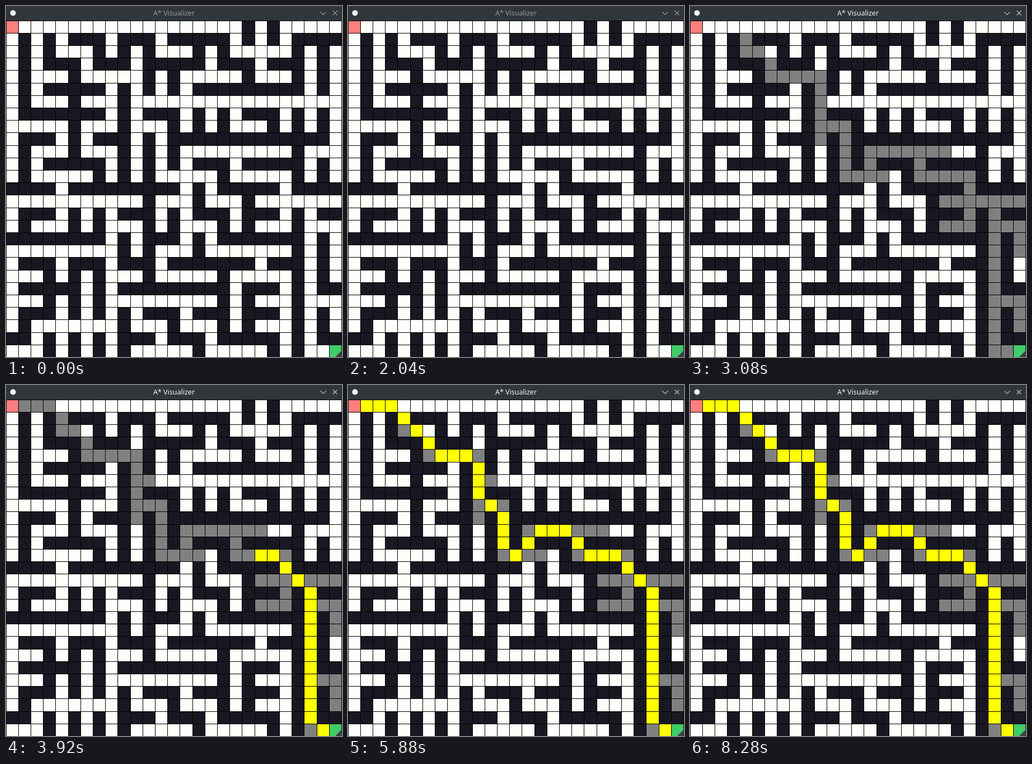
Animation, 600 px wide and 625 px high, one loop 8.32 s. Source, as an HTML page with a canvas:

```html
<!DOCTYPE html>
<html lang="en">
<head>
<meta charset="utf-8">
<title>A* Visualizer</title>
<style>
html, body { margin: 0; width: 100%; height: 100%; overflow: hidden; background: #31363b; }
canvas { display: block; }
</style>
</head>
<body>
<canvas width="600" height="625"></canvas>
<script>
const maze = `
...................#.#.....
.#.#.###.###.#####.#.#.####
.#.#...#.#.#...#.#.....#.#.
.#.###.###.#####.###.###.#.
.#...#.....#.#.....#...#.#.
.#.#####.#.#.#.#########.#.
.#...#...#.................
.#######.#.###.#.#.###.#.#.
.....#...#...#.#.#...#.#.#.
.###.#.###.#.#############.
.#...#...#.#.#.........#...
.#.#####.#.#.#.###.#####.#.
.#.....#.#.#.....#.....#.#.
####.#########.#.#####.####
...........#...#...#.......
.###.#.#.###.#.###.###.#.##
.#...#.#...#.#...#.#...#...
########.#.###.#.#######.#.
.........#.#...#.......#.#.
.###.###.###.#######.###.#.
...#.#.#...#.....#.....#.#.
.#####.#.#########.###.#.##
...#.#.#.........#.#...#...
.###.#.#.#.###.###.###.#.#.
.#.......#...#...#.#...#.#.
##.#.#.#.###.###.#####.#.##
...#.#.#.#.....#.....#.#...`.trim().split('\n');

const N = 27, SIZE = 22.2, TOP = 26, LOOP = 8320;
const FOCUS = 2050, SEARCH = 2330, VISIT = 10.7, TRACE = 3125, STEP = 49;
const ctx = document.querySelector('canvas').getContext('2d');

// A* from the bottom right to the top left; the first parent found is kept.
function solve() {
  const first = { r: N - 1, c: N - 1, g: 0, f: 0 };
  const open = [first], seen = new Set([N * N - 1]), visited = [], path = [];
  while (open.length) {
    open.sort((a, b) => a.f - b.f);
    const cell = open.shift();
    if (!cell.r && !cell.c) {
      for (let p = cell.parent; p !== first; p = p.parent) path.unshift(p);
      break;
    }
    if (cell !== first) visited.push(cell);
    for (let dr = -1; dr <= 1; dr++) for (let dc = -1; dc <= 1; dc++) {
      const r = cell.r + dr, c = cell.c + dc, id = r * N + c;
      if (maze[r]?.[c] !== '.' || seen.has(id)) continue;
      seen.add(id);
      const g = cell.g + Math.hypot(dr, dc);
      open.push({ r, c, g, f: g + Math.hypot(r, c), parent: cell });
    }
  }
  return { visited, path };
}
const { visited, path } = solve();

function fillCell(r, c, color) {
  const x = Math.floor(c * SIZE) + 1, y = TOP + Math.floor(r * SIZE) + 1;
  ctx.fillStyle = color;
  ctx.fillRect(x, y, Math.floor((c + 1) * SIZE) - x, TOP + Math.floor((r + 1) * SIZE) - y);
}

function line(...points) {
  ctx.beginPath();
  for (const [x, y] of points) ctx.lineTo(x, y);
  ctx.stroke();
}

function titleBar(t) {
  const k = Math.min(1, Math.max(0, (t - FOCUS) / 150));
  const gray = (a, b) => `rgb(${[0, 1, 2].map(() => Math.round(a + (b - a) * k))})`;
  ctx.fillStyle = '#31363b';
  ctx.fillRect(0, 0, 600, TOP);
  ctx.fillStyle = '#fcfcfc';
  ctx.beginPath();
  ctx.arc(12.5, 12.5, 5, 0, 7);
  ctx.fill();
  ctx.fillStyle = gray(150, 245);
  ctx.font = '12.5px "Noto Sans", sans-serif';
  ctx.textAlign = 'center';
  ctx.fillText('A* Visualizer', 300, 17);
  ctx.strokeStyle = gray(150, 190);
  ctx.lineWidth = 1.1;
  line([561.5, 10.5], [566.5, 15.5], [571.5, 10.5]);
  line([583.5, 8.5], [591.5, 16.5]);
  line([591.5, 8.5], [583.5, 16.5]);
}

function draw(now) {
  const t = now % LOOP;
  ctx.fillStyle = '#020204';
  ctx.fillRect(0, 0, 600, 625);
  titleBar(t);
  for (let r = 0; r < N; r++)
    for (let c = 0; c < N; c++)
      fillCell(r, c, maze[r][c] === '#' ? '#191722' : '#fdfffa');
  visited.forEach((p, i) => t >= SEARCH + (i + 1) * VISIT && fillCell(p.r, p.c, '#808080'));
  path.forEach((p, i) => t >= TRACE + (i + 1) * STEP && fillCell(p.r, p.c, '#ffff00'));
  fillCell(0, 0, '#ff7f7f');
  fillCell(N - 1, N - 1, '#40cc68');
  ctx.fillStyle = '#3b4047';
  ctx.beginPath();
  ctx.moveTo(600, 613);
  ctx.lineTo(600, 625);
  ctx.lineTo(588, 625);
  ctx.fill();
  requestAnimationFrame(() => draw(performance.now() - start));
}
const start = performance.now();
draw(0);
</script>
</body>
</html>
```
